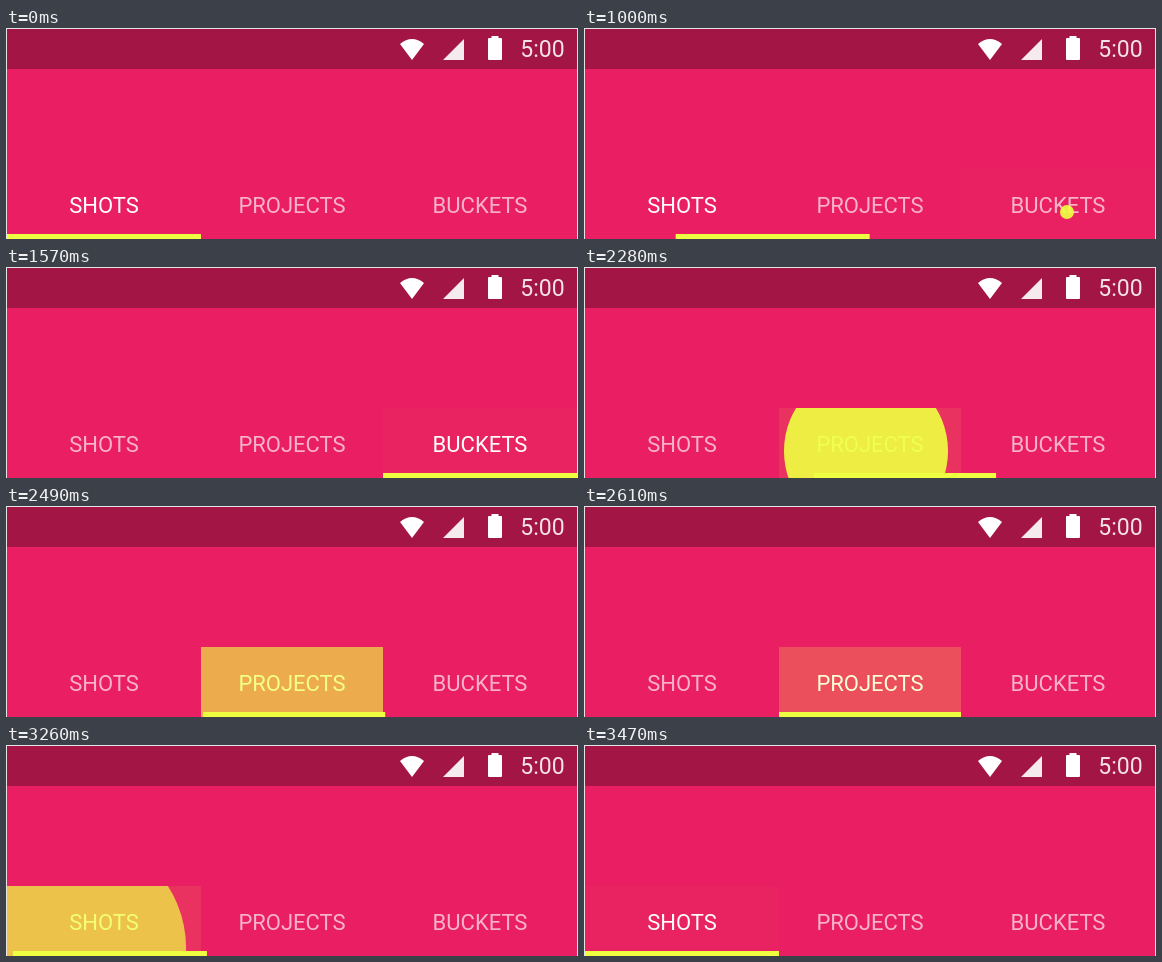
Write an HTML page with a canvas that moves like this. It is 572x211 px and loops after 3530 ms.

```html
<!DOCTYPE html>
<html lang="en">
<head>
<meta charset="utf-8">
<title>Tabs</title>
<style>
html, body { margin: 0; width: 100%; height: 100%; overflow: hidden; background: #e91e63; }
canvas { display: block; width: 572px; height: 211px; }
</style>
</head>
<body>
<canvas id="stage" width="572" height="211"></canvas>
<script>
const ctx = document.getElementById('stage').getContext('2d');
const LOOP = 3530, STEP = 30, LAST = 19;
const PINK = '#e91e63', DARK = '#a31545', LIME = '#eeff41', EDGE = '#e6e3e4';
const TOP = 141, BOTTOM = 211, BAR_Y = 206, DIM = 0.66;

const tabs = [
  { label: 'SHOTS', x: 1, w: 194 },
  { label: 'PROJECTS', x: 195, w: 182 },
  { label: 'BUCKETS', x: 377, w: 194 }
];
// cx, cy: press point; lead: progress of the bar at the first step
const moves = [
  { at: 1000, from: 0, to: 2, cx: 483, cy: 184, lead: 0.176 },
  { at: 2100, from: 2, to: 1, cx: 282, cy: 184, lead: 0.205 },
  { at: 2900, from: 1, to: 0, cx: 65, cy: 203, lead: 0.178 }
];

const clamp = (v, lo = 0, hi = 1) => Math.min(hi, Math.max(lo, v));
const mix = (a, b, p) => a + (b - a) * p;

// cubic-bezier(.25, .1, .25, 1)
function ease(x) {
  if (x <= 0 || x >= 1) return clamp(x);
  let lo = 0, hi = 1, s = 0.5;
  for (let i = 0; i < 24; i++) {
    s = (lo + hi) / 2;
    if (0.75 * s * (1 - s) + s ** 3 < x) lo = s; else hi = s;
  }
  return 0.3 * s * (1 - s) ** 2 + 3 * s * s * (1 - s) + s ** 3;
}

function rect(color, x, y, w, h) {
  ctx.fillStyle = color;
  ctx.fillRect(x, y, w, h);
}

function shape(color, points) {
  ctx.fillStyle = color;
  ctx.beginPath();
  points.forEach(([x, y]) => ctx.lineTo(x, y));
  ctx.fill();
}

function statusBar() {
  rect(DARK, 1, 1, 570, 40);
  ctx.fillStyle = '#fff';
  ctx.beginPath();
  ctx.moveTo(406, 32);
  ctx.lineTo(394, 16);
  ctx.quadraticCurveTo(406, 6, 418, 16);
  ctx.fill();
  shape('#f5eaee', [[458, 11], [458, 32], [437, 32]]);
  rect('#fff', 485.5, 8, 7, 3);
  ctx.beginPath();
  ctx.roundRect(482, 10, 14, 22, 1);
  ctx.fill();
  ctx.font = '23px Roboto, sans-serif';
  ctx.textAlign = 'left';
  ctx.fillStyle = 'rgba(255,255,255,.88)';
  ctx.fillText('5:00', 514.3, 29);
}

function label(tab, alpha) {
  ctx.font = '22px Roboto, sans-serif';
  ctx.textAlign = 'center';
  ctx.fillStyle = `rgba(255,255,255,${alpha})`;
  ctx.fillText(tab.label, tab.x + tab.w / 2, 185);
}

function ripple(move, n) {
  const tab = tabs[move.to];
  const total = Math.min(0.92, 0.22 + 0.102 * (17 - n));
  const outer = Math.min(0.09, 0.01 + 0.014 * n, total);
  const radius = 141 - 134 * Math.exp(-0.1368 * n);
  ctx.save();
  ctx.beginPath();
  ctx.rect(tab.x, TOP, tab.w, BOTTOM - TOP);
  ctx.clip();
  ctx.globalAlpha = outer;
  rect(LIME, tab.x, TOP, tab.w, BOTTOM - TOP);
  ctx.globalAlpha = (total - outer) / (1 - outer);
  ctx.beginPath();
  ctx.arc(move.cx, move.cy, radius, 0, 2 * Math.PI);
  ctx.fill();
  ctx.restore();
}

function draw(t) {
  const move = moves.filter(m => m.at <= t).pop();
  rect(EDGE, 0, 0, 572, 211);
  statusBar();
  rect(PINK, 1, 41, 570, 170);

  if (!move) {
    tabs.forEach((tab, i) => label(tab, i ? DIM : 1));
    rect(LIME, tabs[0].x, BAR_Y, tabs[0].w, 5);
    return;
  }

  const n = Math.min(LAST, Math.floor((t - move.at) / STEP));
  const fade = clamp((n + 0.2) / 6);
  tabs.forEach((tab, i) => {
    const lit = i === move.to ? fade : i === move.from ? 1 - fade : 0;
    label(tab, mix(DIM, 1, lit));
  });
  ripple(move, n);

  const to = tabs[move.to];
  const x = mix(tabs[move.from].x, to.x, ease(move.lead + 0.05 * n));
  rect(LIME, x, BAR_Y, to.w, 5);
}

const start = performance.now();
function tick() {
  draw((performance.now() - start) % LOOP);
  requestAnimationFrame(tick);
}
tick();
</script>
</body>
</html>
```
